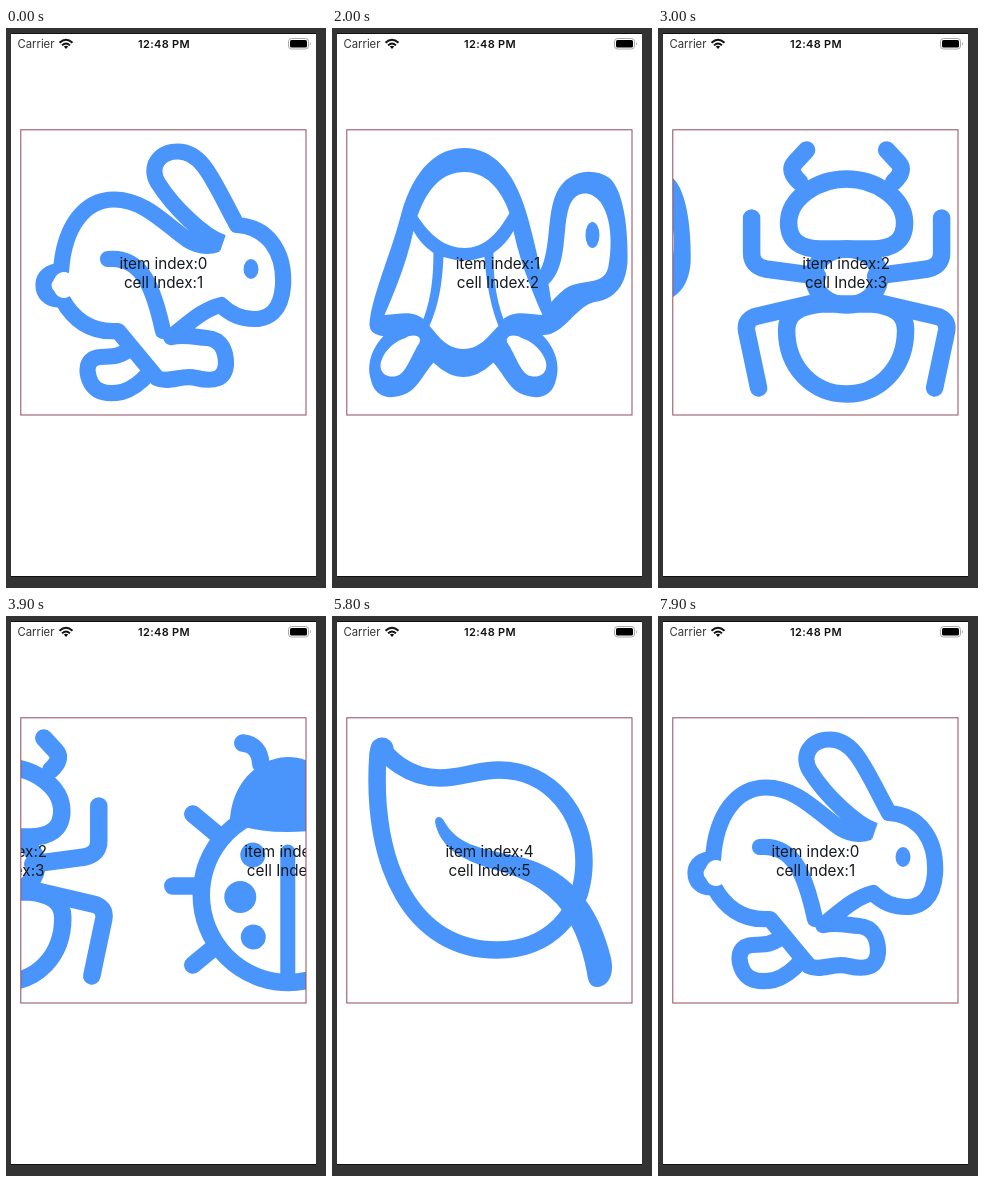
Write an HTML page that moves like this. It is 320 px wide and 560 px high and loops after 8 s.

```html
<!DOCTYPE html>
<html lang="en">
<head>
<meta charset="utf-8">
<title>Paged carousel</title>
<style>
  html, body { margin: 0; width: 100%; height: 100%; overflow: hidden; background: #333; }
  svg { display: block; width: 320px; height: 560px; font-family: Inter, Roboto, sans-serif; }
  .line { fill: none; stroke: #4a95fb; stroke-width: 17.5; stroke-linejoin: round; }
  .hare .line { stroke-width: 16.2; }
  .round { stroke-linecap: round; }
  .fill { fill: #4a95fb; }
  .hole { fill: #fff; }
  .label { font-size: 15.25px; text-anchor: middle; fill: #14181f; }
</style>
</head>
<body>
<svg viewBox="0 0 320 560">
  <clipPath id="window"><rect x="15" y="102" width="285" height="285"/></clipPath>
  <rect x="5" y="5" width="305" height="544" fill="#111"/>
  <rect x="5" y="6" width="305" height="542" fill="#fff"/>

  <text x="11.5" y="20" font-size="11.3" fill="#333">Carrier</text>
  <text x="158" y="20" font-size="11" font-weight="600" letter-spacing=".3" text-anchor="middle" fill="#111">12:48 PM</text>
  <g fill="none" stroke="#111" stroke-width="1.9">
    <path d="M53.5 14.8Q60 8.8 66.5 14.8M56 17.4Q60 13.8 64 17.4"/>
    <path d="M57.8 18.6Q60 16.8 62.2 18.6L60 21Z" fill="#111" stroke="none"/>
  </g>
  <rect x="282.5" y="10.5" width="20" height="10.5" rx="3" fill="none" stroke="#aaa"/>
  <rect x="284" y="12" width="17" height="7.5" rx="1.6" fill="#000"/>
  <path d="M304 14Q306 15.8 304 17.6Z" fill="#aaa"/>

  <g clip-path="url(#window)"><g id="track"></g></g>
  <rect x="14.8" y="101.8" width="285.200" height="285.200" fill="none" stroke="#914a5a"/>
</svg>
<script>
const PAGE = 285, LOOP = 8000, SETTLE = 70;
const swipeStarts = [1625, 2735, 3769, 4702, 5830];

const line = (d, round = true) => `<path class="line${round ? ' round' : ''}" d="${d}"/>`;
const fill = d => `<path class="fill" d="${d}"/>`;
const hole = d => `<path class="hole" d="${d}"/>`;
const oval = (x, y, rx, ry = rx, kind = 'fill') =>
  `<ellipse class="${kind}" cx="${x}" cy="${y}" rx="${rx}" ry="${ry}"/>`;
const shift = (x, content) => `<g transform="translate(${x})">${content}</g>`;
const mirrored = (axis, content) =>
  content + `<g transform="translate(${2 * axis}) scale(-1 1)">${content}</g>`;

const hare = '<g class="hare">' +
  // ear, head, chest, front foot, belly, tail and back
  line('M217 215C197 208 168 180 152 155C142 138 154 123.500 172 123.500C197 123.500 207 153 231 197C262 199 279 224 277 258C275 284 262 291 248 291C232 291 222 284 215 277C195 282 181 297 165 309C178 306 188 309 201 310C216 311 220 324 220 336C219 352 207 354 190 350C176 346 163 356 151 350C141 338 127 321 112 303C86 305 68 293 56 271C42 273 37.500 264 37.500 257C37.500 249 44 243 55 243C58 198 79 171.500 108 171.500C139 171.500 160 197 182 212Q197 221 211 216', false) +
  oval(58, 257, 11, 13, 'hole') +
  line('M102 231C135 228 147 257 157 303') +
  line('M126 318C110 335 97 325 87 331C79 336 81 347 85 355C92 367 106 366 116 364Q130 360 143 345', false) +
  oval(245, 241, 7.5, 10) + '</g>';

const tortoise = shift(-8,
  fill('M37 296C39 268 58 228 69 185C82 140 105 120 132 120C160 120 182 143 194 185C200 205 205 228 208 242C219 220 214 187 224 165C234 143 260 138 277 150C292 163 296 205 295 235C293 260 280 272 262 274C245 278 235 300 218 306C200 310 190 301 175 321C158 338 147 349 131 349C115 349 104 338 87 321C72 301 64 311 50 308Q37 306 37 296Z') +
  hole('M85 188C95 160 110 144 132 144C153 144 168 160 177 185C164 208 150 220 132 220C113 220 98 208 85 188Z') +
  hole('M111 229Q132 236 152 229C154 255 158 278 166 298C158 305 149 321 131 321C113 321 105 306 97 298C106 278 110 255 111 229Z') +
  mirrored(131, hole('M81 203Q88 216 101 225C101 252 98 272 91 291C80 282 68 286 52 287C63 262 75 232 81 203Z')) +
  hole('M216 256C236 238 229 200 237 178C243 162 258 162 268 174C279 190 280 215 276 238C273 256 255 252 240 257C232 260 226 266 219 274Z') +
  oval(260, 207, 7, 13) +
  mirrored(131,
    fill('M60 300C40 315 34 335 38 350C42 372 60 372 75 365C88 358 93 340 108 328L94 296Z') +
    hole('M73 310C81 305 93 308 85 318C78 330 73 346 64 348C50 351 45 340 50 330C55 319 64 313 73 310Z')));

const ant = shift(-31,
  line('M131 195C131 170 160 151 189 151C218 151 247 170 247 195C247 213 235 221 215 221H163C143 221 131 213 131 195Z') +
  line('M163 276H215C235 278 248 285 248 302C248 340 222 366 189 366C156 366 129 340 129 302C129 285 143 278 163 276Z') +
  oval(189, 249, 33, 28, 'line') +
  mirrored(189,
    line('M94 190V225Q94 238 108 241L160 248') +
    line('M101 360L89 303Q87 291 100 288L160 274') +
    line('M149 122L137 135Q130 143 142 154')));

const ladybug =
  oval(157.5, 279, 87, 87.5, 'line') +
  fill('M99 207C100 165 130 141 157.500 141C185 141 215 165 216 207Q190 216 157.500 216Q125 216 99 207Z') +
  `<path class="line round" style="stroke-width:15" d="M157 236V365"/>` +
  mirrored(157.5,
    oval(122, 239, 12.5) + oval(109.5, 281, 16) + oval(122.5, 321, 12.5) +
    line('M42 270H68M62 198L86 218M62 349L85 330M112 127Q129 129 130 148'));

const leaf =
  line('M50 132C55 140 75 162 108 162C130 162 145 154 167 154C220 154 252 200 252 245C252 300 215 334 165 334C82 334 38 252 46 138Q47 132 50 132Z') +
  oval(50, 133, 11.5) +
  fill('M103 206C103 200 109 199 112 205C125 228 145 232 185 240C235 252 265 285 279 342C283 360 275 371 265 371C258 371 256 365 255 357C250 330 240 305 225 288C205 267 185 260 160 253C130 244 108 232 103 206Z');

const items = [hare, tortoise, ant, ladybug, leaf];
const track = document.getElementById('track');
track.innerHTML = [...items, hare].map((icon, page) => {
  const index = page % items.length;
  return shift(page * PAGE, icon +
    `<text class="label" x="157.500" y="241">item index:${index}</text>` +
    `<text class="label" x="157.500" y="260">cell Index:${index + 1}</text>`);
}).join('');

// Each swipe accelerates, then settles like a critically damped spring.
function swipeProgress(elapsed) {
  const x = Math.max(0, elapsed) / SETTLE;
  return 1 - (1 + x) * Math.exp(-x);
}

function draw(now) {
  const time = now % LOOP;
  const scroll = swipeStarts.reduce((sum, start) => sum + swipeProgress(time - start), 0) * PAGE;
  track.setAttribute('transform', `translate(${-scroll.toFixed(2)})`);
  requestAnimationFrame(draw);
}
draw(performance.now());
</script>
</body>
</html>
```
